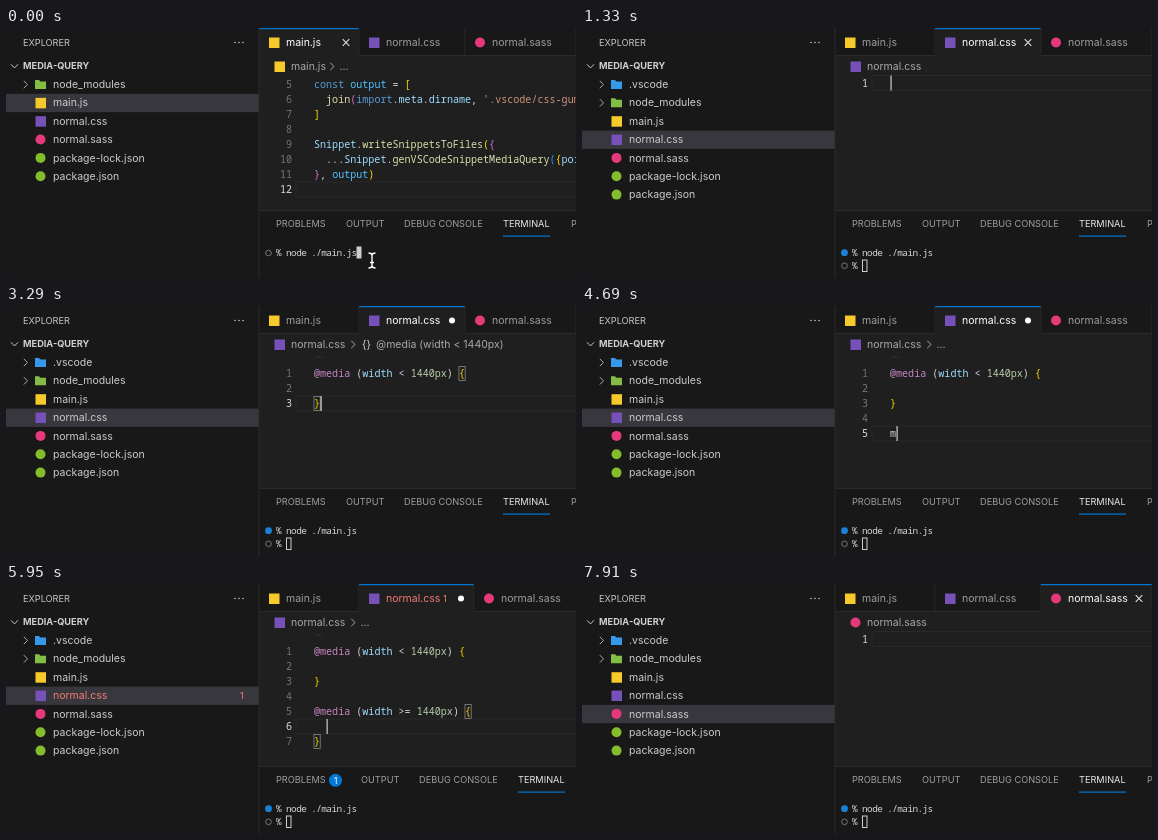
These frames come from a looping animation (570 by 250 pixels, 8 s). An HTML page:

```html
<!DOCTYPE html>
<html lang="en">
<head>
<meta charset="utf-8">
<title>Editor snippets</title>
<style>
html, body { margin: 0; width: 100%; height: 100%; overflow: hidden; background: #181818; }
svg { display: block; width: 570px; height: 250px; }
text { white-space: pre; }
.ui { font: 10.5px Inter, sans-serif; }
.head { font: 9.2px Inter, sans-serif; }
.bold { font: 700 9.2px Inter, sans-serif; }
.code { font: 500 10.07px "Noto Sans Mono", monospace; }
.term { font: 500 9.4px "Noto Sans Mono", monospace; letter-spacing: -0.59px; }
.hit { fill: #2aaaff; font-weight: 700; }
</style>
</head>
<body>
<svg id="stage" viewBox="0 0 570 250"></svg>
<script>
const LOOP = 8000;
const stage = document.getElementById('stage');
const ERR = '#f27d72', BLUE = '#0078d4', LINE = '#2b2b2b';
const MOUSE = { x: 366, y: 232 };
const INK = {
  key: '#569cd6', at: '#c586c0', name: '#9cdcfe', cnst: '#4fc1ff', fn: '#dcdcaa',
  str: '#ce9178', num: '#b5cea8', op: '#d4d4d4', b1: '#ffd700', b2: '#da70d6', b3: '#179fff'
};

// Suggestion rows: icon kind, then the label with matched letters in brackets.
const LISTS = {
  m: ['s [m]ax-p0', 's [m]ax-p1', 's [m]ax-p2', 's [m]in-p0', 's [m]in-p1', 's [m]in-p2', 'k [m]ain', 'k [m]ap'],
  ma: ['s [ma]x-p0', 's [ma]x-p1', 's [ma]x-p2', 'k [ma]in', 'k [ma]p', 'k [ma]rk', 'k [ma]rker', 'k [ma]sk'],
  max: ['s [max]-p0', 's [max]-p1', 's [max]-p2', 'k feColor[Ma]tri[x]', 'k feConvolve[Ma]tri[x]', 'c ::-[m]s-e[x]p[a]nd'],
  mi: ['s [mi]n-p0', 's [mi]n-p1', 's [mi]n-p2', 'k [m]a[i]n', 'c :-[m]s-[i]nput-placeholder', 'c :-[m]oz-u[i]-invalid', 'k [m]enu[i]tem', 'c :-[m]oz-subm[i]t-invalid'],
  min: ['s [min]-p0', 's [min]-p1', 's [min]-p2', 'k [m]a[in]', 'c :-[m]s-[in]put-placeholder', 'c :-[m]oz-ui-[in]valid', 'k [m]e[n]u[i]tem', 'c :-[m]oz-submit-[in]valid']
};

const START = {
  file: 'js', folder: 0, term: 0, focus: 'term', mouse: 1, blocks: 0, word: '', list: 0, sel: 0,
  err: 0, dirty: 0, lens: 0, crumb: '', at: [1, 0], caret: 1
};
const STEPS = [
  [70, { term: 1, mouse: 0 }], [140, { folder: 1 }], [280, { term: 2 }],
  [700, { focus: 'edit' }], [980, { file: 'css' }],
  [1610, { word: 'm', dirty: 1 }], [1750, { list: 1 }], [1820, { word: 'ma' }], [1960, { word: 'max' }],
  [2100, { err: 1, lens: 1, crumb: 'max' }], [2310, { sel: 1 }],
  [2450, { blocks: 1, word: '', list: 0, sel: 0, at: [2, 2] }], [2520, { crumb: '@media (width < 1440px)' }],
  [2870, { err: 0 }], [3290, { at: [3, 1] }],
  [3640, { at: [4, 0] }], [3780, { at: [5, 0], crumb: '...' }],
  [4340, { caret: 0 }], [4690, { caret: 1, word: 'm' }], [4830, { word: 'mi', list: 1 }],
  [4970, { word: 'min' }], [5180, { err: 1 }],
  [5600, { sel: 1 }], [5740, { blocks: 2, word: '', list: 0, sel: 0, at: [6, 2] }],
  [6020, { crumb: '@media (width >= 1440px)' }], [6300, { err: 0 }],
  [6860, { dirty: 0 }], [7350, { file: 'sass' }], [7910, { caret: 0 }]
];

const esc = s => String(s).replace(/&/g, '&amp;').replace(/</g, '&lt;');
const text = (x, y, s, fill, cls = 'ui', more = '') =>
  `<text x="${x}" y="${y}" fill="${fill}" class="${cls}" ${more}>${esc(s)}</text>`;
const rect = (x, y, w, h, fill, more = '') =>
  `<rect x="${x}" y="${y}" width="${w}" height="${h}" fill="${fill}" ${more}/>`;
const dot = (x, y, r, fill, more = '') => `<circle cx="${x}" cy="${y}" r="${r}" fill="${fill}" ${more}/>`;
const path = (d, stroke, w = 1, fill = 'none') =>
  `<path d="${d}" stroke="${stroke}" stroke-width="${w}" fill="${fill}"/>`;
const chevron = (x, y, fill = '#a8a8a8') => path(`M${x - 1.7} ${y - 3.7}l3.7 3.7l-3.7 3.7`, fill);
const dots = (x, y, gap, fill, r = .8) => [0, 1, 2].map(i => dot(x + i * gap, y, r, fill)).join('');

// Alternating colour keys and pieces of code.
function code(x, y, parts) {
  let spans = '';
  for (let i = 0; i < parts.length; i += 2)
    spans += `<tspan fill="${INK[parts[i]]}">${esc(parts[i + 1])}</tspan>`;
  return `<text x="${x}" y="${y}" class="code">${spans}</text>`;
}

function icon(kind, x, y) {
  if (kind === 'js') return rect(x - 5, y - 5, 10.5, 10.5, '#f7ca2c');
  if (kind === 'css') return rect(x - 5, y - 5, 10.5, 10.5, '#7651b8');
  if (kind === 'sass') return dot(x, y, 5, '#e5397b');
  if (kind === 'node') return dot(x, y, 5, '#83bd2c');
  const fill = kind === 'blue' ? '#3598e8' : '#83bd45';
  return path(`M${x - 5.5} ${y - 4.5}h4l1.5 1.5h5.5v7.5h-11z`, 'none', 0, fill);
}

function sidebar(s) {
  let out = text(17, 18, 'EXPLORER', '#c5c5c5', 'head') + dots(229, 14.5, 4, '#c5c5c5') +
    path('M5 36.3l3.5 3.6l3.5 -3.6', '#ccc') + text(17, 41.2, 'MEDIA-QUERY', '#d0d0d0', 'bold');
  const rows = [['node_modules', 'green'], ['main.js', 'js'], ['normal.css', 'css'],
    ['normal.sass', 'sass'], ['package-lock.json', 'node'], ['package.json', 'node']];
  if (s.folder) rows.unshift(['.vscode', 'blue']);
  rows.forEach(([name, kind], i) => {
    const y = 56.5 + i * 18.35, bad = s.err && kind === 'css';
    if (kind === s.file) out += rect(0, y - 9, 253, 18.3, '#37373d');
    if (kind === 'blue' || kind === 'green') out += chevron(19.5, y);
    out += icon(kind, 34.5, y) + text(47, y + 3.6, name, bad ? ERR : '#ccc');
    if (bad) out += text(234, y + 3.4, '1', ERR, 'head');
  });
  return out;
}

function tabs(s) {
  const grow = s.err ? 9 : 0;
  let out = rect(253, 0, 317, 28, '#181818') + rect(253, 27, 317, 1, LINE);
  [['js', 'main.js', 253, 100], ['css', 'normal.css', 353, 106 + grow], ['sass', 'normal.sass', 459 + grow, 111]]
    .forEach(([kind, name, x, w]) => {
      const on = kind === s.file, css = kind === 'css', end = x + w - 13;
      if (on) out += rect(x, 0, w, 28, '#1f1f1f') + rect(x, 0, w, 1.2, BLUE);
      out += rect(x + w - .5, 0, .8, 27, LINE) + icon(kind, x + 15, 14.5) +
        text(x + 27, 18, name, css && s.err ? ERR : on ? '#fff' : '#9d9d9d');
      if (css && s.err) out += text(x + 84, 18, '1', ERR, 'head');
      if (css && s.dirty) out += dot(end, 14.5, 3, '#fff');
      else if (on) out += path(`M${end - 3.3} 11.2l6.6 6.6m0 -6.6l-6.6 6.6`, '#ddd', 1.1);
    });
  return out;
}

function crumbs(s) {
  const name = { js: 'main.js', css: 'normal.css', sass: 'normal.sass' }[s.file];
  const crumb = s.file === 'js' ? '...' : s.file === 'css' ? s.crumb : '';
  const x = s.file === 'js' ? 326 : 347, ink = '#a9a9a9';
  let out = icon(s.file, 273.5, 38.5) + text(285, 42, name, ink);
  if (!crumb) return out;
  out += chevron(x, 38.5);
  if (crumb === '...') return out + text(x + 7.5, 42, crumb, ink);
  out += crumb === 'max'
    ? path('M355 36.5l3 -3l2.5 2.5l-3 3zM360 36.5h3M358 39v3.5h5M363 35h3v3h-3zM363 41h3v3h-3z', '#ee9d28', 1.1)
    : text(356, 42, '{}', '#ccc');
  return out + text(370, 42, crumb, ink);
}

const lineNo = (n, y, on) => text(286, y, n, on ? '#ddd' : '#6e7681', 'code', 'text-anchor="end"');
const currentLine = y => rect(290, y - 7.5, 281, 15, 'none', 'stroke="#292929"');

function script() {
  const rows = [
    ['key', 'const ', 'cnst', 'output', 'op', ' = ', 'b1', '['],
    ['fn', '  join', 'b2', '(', 'key', 'import', 'op', '.', 'name', 'meta', 'op', '.', 'name', 'dirname',
      'op', ', ', 'str', "'.vscode/css-gum"],
    ['b1', ']'], [],
    ['name', 'Snippet', 'op', '.', 'fn', 'writeSnippetsToFiles', 'b1', '(', 'b2', '{'],
    ['op', '  ...', 'name', 'Snippet', 'op', '.', 'fn', 'genVSCodeSnippetMediaQuery', 'b3', '(', 'b1', '{', 'name', 'poi'],
    ['b2', '}', 'op', ', ', 'cnst', 'output', 'b1', ')'], []
  ];
  return currentLine(161.5) + rows.map((parts, i) => {
    const y = 60 + i * 15;
    return lineNo(i + 5, y, i === 7) + code(308, y, parts);
  }).join('');
}

function suggestions(s, top) {
  const rows = LISTS[s.word];
  let out = rect(328, top, 250, rows.length * 15 + 2, '#202020', 'stroke="#454545"');
  rows.forEach((row, i) => {
    const y = top + 8.5 + i * 15, on = i === s.sel, hover = Math.abs(y - MOUSE.y) < 7.5;
    if (on || hover) out += rect(328.5, y - 7.8, 242, 15.3, on ? '#04395e' : '#2e2e2e');
    if (row[0] === 's')
      out += path(`M332 ${y + 4}v-8.5h9v8.5`, '#ccc') +
        `<path d="M332 ${y + 4.5}h9.5" stroke="#ccc" stroke-dasharray="1.5 1.2"/>`;
    else if (row[0] === 'k')
      out += path(`M331 ${y - 3.5}h4m2 0h5M331 ${y - .5}h7m2 0h2M331 ${y + 2.5}h3m2 0h6`, '#ccc', 1.2);
    else
      out += path(`M336.5 ${y - 5}l4.5 2.3v5l-4.5 2.5l-4.5 -2.5v-5zM332 ${y - 2.7}l4.5 2.3l4.5 -2.3M336.5 ${y - .4}v5`, '#b180d7');
    const label = row.slice(2).replace(/\[(.+?)\]/g, '<tspan class="hit">$1</tspan>');
    out += `<text x="346" y="${y + 3.5}" class="code" fill="${on ? '#fff' : '#ccc'}">${label}</text>`;
  });
  return out;
}

function sheet(s) {
  const css = s.file === 'css', lens = css && s.lens;
  const [row, col] = css ? s.at : [1, 0];
  const mid = n => (lens ? 67.5 : 55) + (n - 1) * 15;
  const blocks = css ? s.blocks : 0;
  const last = Math.max(row, blocks ? blocks * 4 - 1 : 1);
  let out = currentLine(mid(row)), over = '';
  if (lens) out += dots(310, 51, 3, '#555', .6);
  for (let n = 1; n <= last; n++) out += lineNo(n, mid(n) + 3.8, n === row);
  for (let b = 0; b < blocks; b++) {
    const first = b * 4 + 1, op = b ? '>=' : '<';
    if (row > first && row <= first + 2) {
      const box = (c, n) => rect(308 + c * 6.04, mid(n) - 7, 6.2, 14, 'none', 'stroke="#888" stroke-width=".8"');
      out += box(23 + op.length, first) + box(0, first + 2);
    }
    out += code(308, mid(first) + 3.8, ['at', '@media ', 'op', '(', 'name', 'width', 'op', ` ${op} `,
      'num', '1440px', 'op', ') ', 'b1', '{']) + code(308, mid(first + 2) + 3.8, ['b1', '}']);
  }
  let x = 308.5 + col * 6.04;
  if (css && s.word) {
    out += code(308, mid(row) + 3.8, ['op', s.word]);
    x += s.word.length * 6.04;
    if (s.err) out += path(`M${x - 1} ${mid(row) + 6}l1.5 -1.5l1.5 1.5l1.5 -1.5`, '#f14c4c');
    if (s.list) over = suggestions(s, mid(row) + 8);
  }
  if (s.caret) out += rect(x, mid(row) - 7.5, 1.1, 15, '#ddd');
  return [out, over];
}

function panel(s) {
  const shift = s.err ? 15 : 0;
  let out = rect(253, 182, 317, 68, '#181818') + rect(253, 182, 317, 1, LINE);
  [['PROBLEMS', 270], ['OUTPUT', 340], ['DEBUG CONSOLE', 398], ['TERMINAL', 497], ['PORTS', 565]]
    .forEach(([name, x], i) => {
      out += text(i ? x + shift : x, 199.3, name, i === 3 ? '#e7e7e7' : '#9d9d9d', 'head');
    });
  out += rect(497 + shift, 207.5, 47, 1.2, BLUE);
  if (s.err) out += dot(329.5, 196.3, 6.5, BLUE) + text(329.5, 199.5, '1', '#fff', 'head', 'text-anchor="middle"');
  const ring = y => dot(262.5, y, 2.8, 'none', 'stroke="#777"');
  out += s.term < 2 ? ring(225) : dot(262.5, 224.7, 3.4, '#1b81d6') + ring(237.8);
  out += text(270, 228, '% node ./main.js', '#d8d8d8', 'term');
  if (s.term === 2) out += text(270, 241.2, '%', '#d8d8d8', 'term');
  const [x, y] = [[350.5, 218.5], [270, 231.5], [280.5, 231.5]][s.term];
  return out + (s.focus === 'term' ? rect(x, y, 5, 12, '#ccc')
    : rect(x, y + .5, 4.5, 11.5, 'none', 'stroke="#ccc"'));
}

function pointer({ x, y }) {
  const beam = `M${x - 3.5} ${y - 7}q3.5 0 3.5 2.5v10q0 2.5 -3.5 2.5M${x + 3.5} ${y - 7}q-3.5 0 -3.5 2.5m0 10q0 2.5 3.5 2.5M${x - 2} ${y + 2.5}h4`;
  return path(beam, '#111', 3) + path(beam, '#fff', 1.4);
}

function scene(t) {
  const s = Object.assign({}, START, ...STEPS.filter(step => step[0] <= t).map(step => step[1]));
  const [body, over] = s.file === 'js' ? [script(), ''] : sheet(s);
  return rect(0, 0, 570, 250, '#181818') + rect(253, 0, 317, 182, '#1f1f1f') + sidebar(s) +
    tabs(s) + crumbs(s) + body + panel(s) + rect(252.5, 0, 1, 250, LINE) + over +
    (s.mouse ? pointer(MOUSE) : '');
}

let shown = '';
const begin = performance.now();
function tick() {
  const next = scene((performance.now() - begin) % LOOP);
  if (next !== shown) stage.innerHTML = shown = next;
  requestAnimationFrame(tick);
}
tick();
</script>
</body>
</html>
```
